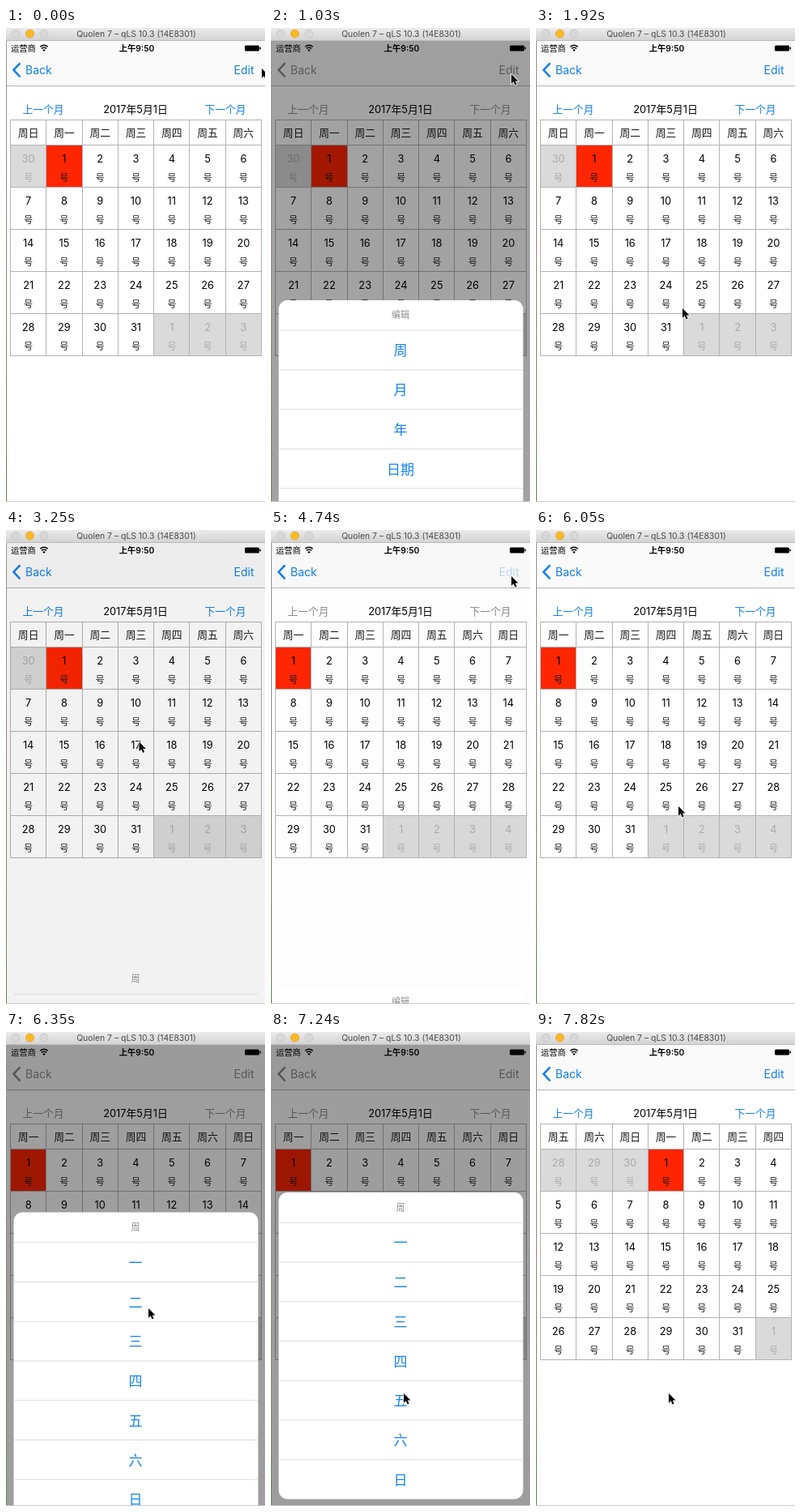
An HTML page that plays this animation: 320 by 585 pixels, repeating every 8000 ms.

```html
<!DOCTYPE html>
<html lang="zh-CN">
<head>
<meta charset="utf-8">
<title>Calendar</title>
<style>
html, body { margin: 0; width: 100%; height: 100%; overflow: hidden; background: #fff; }
svg { display: block; width: 100%; height: 100%; }
text { font-family: Inter, "Noto Sans CJK SC", "Noto Sans CJK", sans-serif; }
</style>
</head>
<body>
<svg id="stage" viewBox="0 0 320 585" preserveAspectRatio="none"></svg>
<script>
const LOOP = 8000, TICK = 147.6, LAST_TICK = 53;
const BLUE = '#127fee', GREY = '#8c8c8c', LINE = '#b3b3b3';
const DAYS = [...'日一二三四五六'];
const CELL_W = 310 / 7, CELL_H = 52;
const ROW = 48.75, HEAD = 37.3, SHEET_BOTTOM = 576.5;

// Text centred vertically on cy.
const text = (x, cy, size, str, fill = '#000', extra = 'text-anchor="middle"') =>
  `<text x="${x}" y="${cy + size * 0.37}" font-size="${size}" fill="${fill}" ${extra}>${str}</text>`;
const rect = (x, y, w, h, fill, extra = '') =>
  `<rect x="${x}" y="${y}" width="${w}" height="${h}" fill="${fill}" ${extra}/>`;
const circle = (x, fill, stroke) =>
  `<circle cx="${x}" cy="7" r="5" fill="${fill}" stroke="${stroke}" stroke-width=".7"/>`;
const path = (d, extra) => `<path d="${d}" ${extra}/>`;

// Grid lines sit on whole pixels.
const colX = i => Math.floor(5.5 + i * CELL_W) + 0.5;
const rowY = i => 144.5 + i * CELL_H;
const centreX = i => 5.5 + (i + 0.5) * CELL_W;

function calendar(start) {
  const lead = (8 - start) % 7;
  let cells = '', labels = '', lines = '';
  for (let i = 0; i < 7; i++) {
    labels += text(centreX(i), 129.6, 12.8, '周' + DAYS[(start + i) % 7], '#1a1a1a');
  }
  for (let i = 0; i < 35; i++) {
    const col = i % 7, x = colX(col), y = rowY(Math.floor(i / 7));
    const n = i - lead + 1, outside = n < 1 || n > 31;
    const day = n < 1 ? n + 30 : n > 31 ? n - 31 : n;
    if (outside || n === 1) cells += rect(x, y, colX(col + 1) - x, CELL_H, outside ? '#dadada' : '#ff2600');
    const ink = outside ? '#aaa' : '#000';
    labels += text(centreX(col), y + 16.6, 12.8, day, ink);
    labels += text(centreX(col), y + 40.3, 11.2, '号', outside ? ink : '#1a1a1a');
  }
  for (let i = 0; i < 8; i++) lines += `M${colX(i)} 113.5V405`;
  for (const y of [113.5, ...[0, 1, 2, 3, 4, 5].map(rowY)]) lines += `M5 ${y}H316`;
  return cells + path(lines, `stroke="${LINE}" fill="none"`) + labels;
}

const menus = {
  edit: { title: '编辑', items: ['周', '月', '年', '日期', '颜色'] },
  week: { title: '周', items: [...'一二三四五六日'] },
};
for (const menu of Object.values(menus)) {
  menu.height = HEAD + ROW * menu.items.length;
  menu.top = SHEET_BOTTOM - menu.height;
}

function sheet({ title, items, height }) {
  let out = rect(9.5, 0, 302, height, '#fff', 'rx="11" class="panel"');
  out += text(160, 18.5, 11, title, '#8a8a8a');
  items.forEach((item, i) => {
    const y = HEAD + i * ROW;
    out += rect(9.5, y - 0.5, 302, 1, '#dcdcdc');
    out += text(160, y + ROW / 2 + 0.5, 17, item, '#1582ff');
  });
  return out;
}

const stage = document.getElementById('stage');
stage.innerHTML = `
  <defs>
    <linearGradient id="bar" x2="0" y2="1"><stop stop-color="#ebebeb"/><stop offset="1" stop-color="#d3d3d3"/></linearGradient>
    <linearGradient id="edge" x2="0" y2="1"><stop stop-color="#8b9a86"/><stop offset=".45" stop-color="#9a8378"/><stop offset="1" stop-color="#5d8a45"/></linearGradient>
  </defs>
  ${rect(0, 0, 320, 585, '#fff')}
  ${rect(0, 16, 320, 55, '#fafafa')}${rect(0, 71, 320, 1, '#b5b5b5')}
  ${text(6, 25, 10.3, '运营商', '#000', '')}
  ${path('M42.3 23.2a6.8 6.8 0 0 1 9.4 0M44 25.4a4.4 4.4 0 0 1 6 0', 'fill="none" stroke="#000" stroke-width="1.5"')}
  ${path('M45.2 27a2.7 2.7 0 0 1 3.6 0L47 29z', '')}
  ${text(161.5, 25, 10.3, '上午9:50', '#000', 'text-anchor="middle" font-weight="600"')}
  ${rect(295, 21.5, 18, 7, '#000', 'rx="1.5"')}${rect(313.6, 23.5, 1.4, 3, '#000', 'rx=".7"')}
  <g id="back" fill="${BLUE}" stroke="${BLUE}">
    ${path('M17.4 43.3L9.4 51.8L17.4 60.3', 'fill="none" stroke-width="2.5"')}
    ${text(24, 52, 14, 'Back', 'inherit', 'stroke="none"').replace('fill="inherit"', '')}
  </g>
  ${text(306.5, 52, 14, 'Edit', BLUE, 'id="edit" text-anchor="end"')}
  <g id="months" fill="${BLUE}">
    ${text(46, 100.2, 12.8, '上一个月', 'inherit')}
    ${text(271, 100.2, 12.8, '下一个月', 'inherit')}
  </g>
  ${text(160, 100.5, 12.8, '2017年5月1日')}
  <g id="calendar"></g>
  ${rect(0, 16, 320, 569, '#000', 'id="dim"')}
  ${Object.keys(menus).map(k => `<g id="${k}Sheet">${sheet(menus[k])}</g>`).join('')}
  ${rect(0, 0, 320, 15, 'url(#bar)')}${rect(0, 15, 320, 1, '#bcbcbc')}
  ${circle(12, '#d8d8d8', '#c0c0c0')}${circle(29.5, '#fdb924', '#dc9c1c')}${circle(47, '#d8d8d8', '#c0c0c0')}
  ${text(161, 7.3, 10.4, 'Quolen 7 – qLS 10.3 (14E8301)', '#4a4a4a')}
  ${rect(0, 16, 1, 569, 'url(#edge)')}${rect(0, 584, 320, 1, '#c9cfc4')}
  <g id="cursor">${path('M0 0V12.6L2.9 9.9L4.9 14.5L7.1 13.5L5.1 9.1H9.1Z', 'transform="scale(.93)" fill="#000" stroke="#fff" stroke-width="1.6" paint-order="stroke"')}</g>`;
const $ = id => document.getElementById(id);

// time, x, y of the pointer tip
const pointer = [
  [0, 316, 50], [140, 314, 49], [440, 314, 49], [735, 297, 57], [1030, 297, 57],
  [1620, 181, 346], [2070, 181, 346], [2660, 168, 280], [2950, 164.5, 261.5], [3840, 164.5, 261.5],
  [4570, 297, 57], [4870, 297, 57], [5610, 176, 341], [6350, 176, 341], [7230, 164, 446],
];
const visits = [
  { menu: 'edit', open: 860, close: 1621 },
  { menu: 'week', open: 1992, close: 3098 },
  { menu: 'edit', open: 4701, close: 5754 },
  { menu: 'week', open: 6124, close: 7378 },
];
const presses = [[730, 1000], [4570, 4850]];
const starts = [[0, 0], [3540, 1], [7815, 5]];

// Critically damped spring: 1 at the start, settling to 0.
const settle = (ms, rate) => (1 + ms * rate) * Math.exp(-ms * rate);
const smooth = u => u * u * (3 - 2 * u);

function pointerAt(t) {
  const i = pointer.findIndex(k => k[0] > t);
  if (i < 0) return pointer.at(-1).slice(1);
  const [a, b] = [pointer[i - 1], pointer[i]];
  const e = smooth((t - a[0]) / (b[0] - a[0]));
  return [a[1] + (b[1] - a[1]) * e, a[2] + (b[2] - a[2]) * e];
}

let shownStart = -1;
function draw(time) {
  const t = Math.min(LAST_TICK, Math.floor((time + 6) / TICK)) * TICK;

  const start = starts.findLast(s => s[0] <= t)[1];
  if (start !== shownStart) $('calendar').innerHTML = calendar(shownStart = start);

  const visit = visits.findLast(v => v.open <= t);
  const closing = !visit || t >= visit.close;
  let shown = 0;
  if (visit) shown = closing ? settle(t - visit.close, 0.024) : 1 - settle(t - visit.open, 0.02);
  if (shown < 0.012) shown = 0;

  for (const name in menus) {
    const active = shown > 0 && visit.menu === name, group = $(name + 'Sheet');
    group.style.display = active ? '' : 'none';
    if (!active) continue;
    const { top } = menus[name];
    group.setAttribute('transform', `translate(0 ${top + (585 - top) * (1 - shown)})`);
    group.querySelector('.panel').style.opacity = closing && shown < 0.9 ? 0 : 1;
  }
  $('dim').style.opacity = 0.385 * (closing ? shown : smooth(shown));

  const late = !closing && t - visit.open > 100;
  $('months').querySelectorAll('text').forEach(m => m.style.fill = closing ? BLUE : GREY);
  $('back').style.fill = $('back').style.stroke = late ? GREY : BLUE;
  $('edit').style.fill = late ? GREY : BLUE;
  $('edit').style.opacity = presses.some(([a, b]) => t >= a && t < b) ? 0.27 : 1;

  $('cursor').setAttribute('transform', `translate(${pointerAt(t)})`);
}

const origin = performance.now();
function frame() {
  draw((performance.now() - origin) % LOOP);
  requestAnimationFrame(frame);
}
frame();
</script>
</body>
</html>
```
